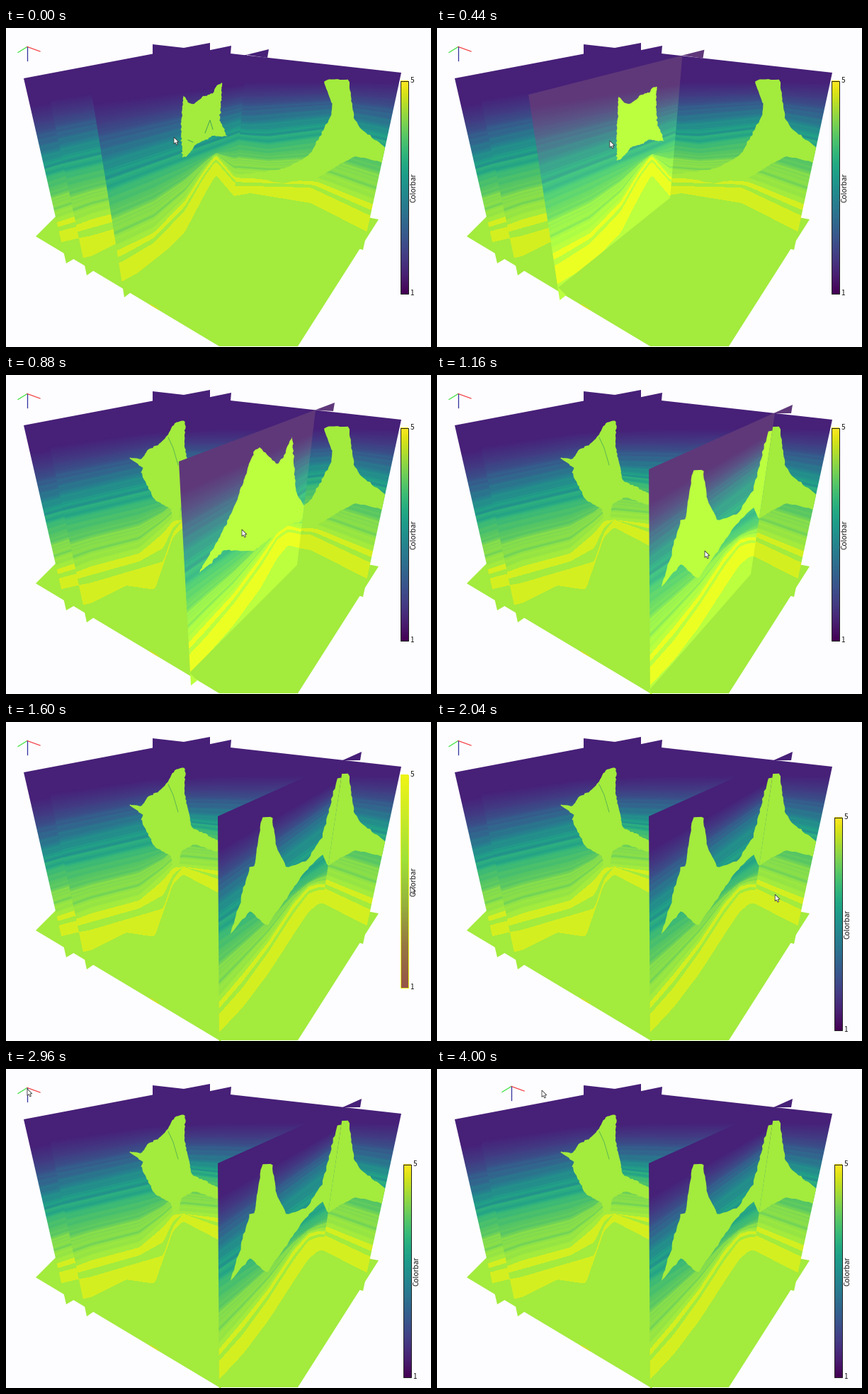
Recreate the animation shown at these times as a matplotlib script. Size 600x450 px, loop 4.04 s.

```python
import numpy as np
import matplotlib.pyplot as plt
from matplotlib.animation import FuncAnimation
from matplotlib.colors import LinearSegmentedColormap, to_rgb
from matplotlib.patches import Polygon, Rectangle
from matplotlib.path import Path

W, H, STEP_MS, FRAMES = 600, 450, 40, 101
LIME, YELLOW = "#a3eb3d", "#d4ef20"
GLOW = np.array([24, 24, 2])
rng = np.random.default_rng(4)

# ---- colour scale of the layers: striped gradient, then two yellow bands ----
ramp = LinearSegmentedColormap.from_list(
    "strata", ["#472078", "#423a83", "#34608d", "#26808e", "#219f88",
               "#33b57c", "#55c565", "#83dc4e", LIME])
grid = np.linspace(0, 1.4, 2801)
noise = np.convolve(rng.normal(size=160), [.25, .5, .25], "same")
ripple = .05 * np.interp(grid, np.linspace(0, 1.05, 160), noise)
ripple *= np.clip((grid - .12) / .3, 0, 1)
LUT = ramp(np.clip(np.where(grid < 1, grid + ripple, 1), 0, 1))[:, :3] * 255
for low, high in ((1.015, 1.06), (1.1, 1.3)):
    LUT[(grid > low) & (grid < high)] = np.array(to_rgb(YELLOW)) * 255
LUT = LUT.astype(int)

LEVELS = [0, .35, .65, 1, 1.1, 1.3, 1.4]
COLS = np.arange(W) + .5
ROWS = (np.arange(H) + .5)[:, None]
KERNEL = np.hanning(11) / np.hanning(11).sum()


def curve(xs, ys):
    line = np.interp(COLS, xs, ys)
    return np.convolve(np.pad(line, 5, "edge"), KERNEL, "valid")


def strata(ys):
    """Layer colours below the given horizon curves."""
    ys = [*ys, ys[-1] + 1]
    depth = np.zeros((H, W))
    for k, rise in enumerate(np.diff(LEVELS)):
        gap = np.maximum(ys[k + 1] - ys[k], .5)
        depth += rise * np.clip((ROWS - ys[k]) / gap, 0, 1)
    return LUT[np.clip(depth * 2000, 0, 2800).astype(int)]


def rough(points, n=160):
    """Even points along an outline, with a slightly ragged edge."""
    p = np.array(points + points[:1], float)
    run = np.r_[0, np.cumsum(np.hypot(*np.diff(p, axis=0).T))]
    at = np.linspace(0, run[-1], n)
    line = np.stack([np.interp(at, run, p[:, i]) for i in (0, 1)], 1)
    return line + rng.normal(0, .5, line.shape)


def blend(keys, s):
    i = min(int(s), len(keys) - 2)
    return keys[i] + (keys[i + 1] - keys[i]) * (s - i)


# ---- moving slice, keyed at four positions ----
# corners: top left, back top, wall foot, front tip
CORNERS = np.array([
    [(121, 92), (371, 30), (322, 238), (167, 380)],
    [(178, 106), (416, 35), (371, 250), (211, 408)],
    [(244, 122), (464, 39), (411, 268), (261, 438)],
    [(299, 133), (502, 42), (443, 281), (301, 463)]], float)
WALL_CUT = np.array([340, 385, 437, 477.])

U = np.array([0, .2, .4, .6, .72, .8, .92, 1])
BASE = np.array([
    [372, 357, 333, 288, 238, 207, 238, 238],
    [415, 376, 340, 292, 235, 208, 235, 238],
    [436, 397, 353, 300, 258, 240, 246, 248],
    [440, 402, 355, 300, 268, 256, 258, 262]], float)
BAND = np.array([26, 28, 30, 30, 26, 19, 20, 20])
SEAM = np.array([20, 22, 17, 16, 11, 10, 9, 7])
# left and right heights of the three upper horizons
UPPER = np.array([
    [(105, 78), (185, 122), (245, 158)],
    [(140, 78), (222, 124), (285, 165)],
    [(165, 80), (245, 124), (310, 175)],
    [(180, 78), (250, 115), (305, 192)]], float)

salt_a = [(249, 182), (247, 140), (250, 95), (258, 106), (264, 108), (279, 96), (292, 92),
          (297, 82), (305, 77), (302, 130), (312, 153), (292, 152), (268, 165), (255, 181)]
salt_b = [(283, 214), (298, 132), (290, 99), (300, 110), (318, 105), (333, 98), (338, 82),
          (347, 80), (340, 140), (351, 163), (376, 188), (376, 204), (343, 189),
          (328, 202), (315, 190), (291, 204)]
salt_c = [(273, 278), (302, 228), (325, 180), (350, 108), (358, 102), (383, 126), (392, 115),
          (404, 86), (409, 165), (422, 186), (418, 206), (395, 213), (350, 248),
          (308, 247), (290, 265)]
salt_d = [(317, 298), (345, 203), (350, 206), (361, 135), (376, 134), (381, 175), (397, 206),
          (425, 195), (447, 160), (467, 80), (490, 73), (462, 205), (454, 203), (447, 186),
          (420, 214), (368, 288), (345, 266)]
SALT = [rough(p) for p in (salt_a, salt_b, salt_c, salt_d)]


def slice_beds(s):
    x0, x1 = blend(CORNERS, s)[0, 0], blend(WALL_CUT, s)
    base = blend(BASE, s)
    xs = x0 + U * (x1 - x0)
    upper = [a + (b - a) * U for a, b in blend(UPPER, s)]
    return [curve(xs, y) for y in (*upper, base - BAND - SEAM, base - BAND, base)]


def slice_outline(s):
    top, back, foot, tip = blend(CORNERS, s)
    cut = blend(WALL_CUT, s)
    return [top, back, back + (-2, 12), (cut, 38 + .118 * (cut - 340)), foot,
            tip - (2, 18), tip + (9, -7), tip]


# ---- fixed planes ----
SIDE = [(25, 71), (207, 36.5), (207, 23), (251, 28), (288, 21), (288, 120), (97, 325), (85, 332)]
SIDE_BEDS = [(110, 98), (180, 162), (225, 200), (288, 262), (300, 280), (315, 297)]
WALL = [(57, 79), (284, 32), (318, 25), (317, 36), (558, 63), (504, 313), (497, 311),
        (430, 400), (300, 400), (124, 342), (114, 349)]
WALL_BEDS = [
    [(57, 100), (200, 80), (300, 75), (560, 75)],
    [(57, 168), (236, 126), (345, 131), (460, 120), (560, 140)],
    [(57, 215), (222, 176), (250, 150), (370, 168), (460, 155), (560, 180)],
    [(57, 292), (120, 266), (188, 248), (236, 203), (300, 208), (440, 215), (560, 262)],
    [(57, 305), (120, 293), (222, 263), (236, 222), (250, 204), (300, 222),
     (430, 225), (515, 265), (560, 280)],
    [(57, 335), (120, 322), (170, 297), (210, 303), (236, 228), (250, 215), (300, 241),
     (345, 233), (430, 247), (515, 290), (560, 310)]]
LEFT_SALT = [
    (175, 117), (191, 119), (200, 106), (214, 99), (228, 85), (234, 73), (241, 66),
    (253, 65), (252, 100), (262, 148), (300, 168), (300, 184), (265, 172), (247, 183),
    (245, 200), (236, 204), (232, 188), (210, 177), (190, 137), (194, 132)]
RIGHT_SALT = [
    (449, 75), (456, 72), (484, 73), (491, 125), (500, 142), (528, 162), (542, 175),
    (540, 192), (495, 181), (475, 190), (440, 212), (390, 219), (330, 207), (395, 198),
    (428, 180), (440, 158), (459, 125), (461, 108), (450, 81)]
FLOOR = [(42, 294), (70, 266), (300, 230), (505, 266), (526, 270), (412, 449), (301, 449)]

# ---- pointer path: ms, x, y ----
MOUSE = np.array([
    (400, 237, 154), (680, 285, 189), (880, 333, 218), (1080, 378, 248),
    (1160, 378, 248), (1440, 571, 230), (1600, 571, 232), (1680, 579, 245),
    (2000, 575, 292), (2200, 86, 48), (2400, 99, 65), (2560, 99, 65), (2880, 30, 28),
    (3000, 30, 28), (3320, 20, 10), (3600, 50, 5), (3840, 105, 26), (4000, 148, 30)], float)


def mouse(t):
    return np.array([np.interp(t, MOUSE[:, 0], MOUSE[:, i]) for i in (1, 2)])


def dragged(t, start, end):
    return mouse(np.clip(t, start, end)) - mouse(start)


# ---- figure ----
fig = plt.figure(figsize=(W / 100, H / 100), dpi=100, facecolor="#fdfdff")
ax = fig.add_axes([0, 0, 1, 1])
ax.axis("off")
PX = .72


def layer(pixels, outline, z):
    im = ax.imshow(pixels.astype(np.uint8), extent=(0, W, H, 0), aspect="auto",
                   interpolation="nearest", zorder=z)
    im.set_clip_path(Path(outline), ax.transData)
    return im


def shape(points, z):
    return ax.add_patch(Polygon(points, fc=LIME, ec="none", zorder=z))


def stroke(points, color, px, z):
    return ax.plot(*zip(*points), color=color, lw=px * PX, zorder=z)[0]


shape(FLOOR, 1)
stroke([(204, 390), (215, 396.5)], "#d4e025", 1.6, 1.1)
layer(strata([curve((25, 100), ys) for ys in SIDE_BEDS]), SIDE, 2)
layer(strata([curve(*zip(*bed)) for bed in WALL_BEDS]), WALL, 3)
shape(rough(LEFT_SALT), 3.1)
stroke([(229, 88), (236, 103), (243, 127)], "#4fae55", .8, 3.2)
shape(rough(RIGHT_SALT), 3.1).set_clip_path(Path(WALL), ax.transData)

sheet = layer(np.zeros((H, W, 3)), slice_outline(0), 4)
salt = shape(SALT[0], 4.1)
cracks = [stroke(p, "#3f9f5a", .9, 4.2) for p in (
    [(281, 148), (288, 130), (292, 143)], [(257, 158), (264, 161)])]

# colour bar
hot = LinearSegmentedColormap.from_list(
    "hot_bar", ["#965548", "#967841", "#96b43c", "#a0e137", "#c8ea28", "#f0f514"])
bar = ax.imshow(np.linspace(1, 0, 256)[:, None], cmap="viridis", aspect="auto",
                extent=(557, 568, 375, 74), zorder=5)
frame = ax.add_patch(Rectangle((557, 74.5), 11, 300.5, fill=False, lw=PX, zorder=5.1))
FONT = dict(family=["Noto Sans CJK JP", "DejaVu Sans"], color="#111111", zorder=5.2)


def label(text, x, y, px=10, **style):
    art = ax.text(x, y, text, size=px * PX, **style, **FONT)
    return art, np.array([x, y])


labels = [label("5", 570.5, 73, va="center_baseline"),
          label("1", 570.5, 373, va="center_baseline"),
          label("Colorbar", 575.5, 225, 10.2, ha="center", va="center", rotation=90)]

# orientation axes
TRIAD = [((-13, 8), "#4be34b"), ((18, 6.5), "#f4484c"), ((0, 19.5), "#3434a0")]
arms = [stroke([(0, 0), end], color, 1.3, 6) for end, color in TRIAD]

ARROW = np.array([(0, 0), (0, 9.5), (2.2, 7.6), (3.8, 11), (5.4, 10.2), (3.9, 7), (6.8, 6.8)])
cursor = ax.add_patch(Polygon(ARROW, fc="white", ec="#333333", lw=.8 * PX, zorder=9))
ax.set(xlim=(0, W), ylim=(H, 0))


def update(i):
    t = i * STEP_MS
    s = np.interp(t, [400, 680, 880, 1080], range(4))
    lit = 200 <= t < 1240 or 2080 <= t < 2480
    glow = GLOW * lit

    outline = Path(slice_outline(s))
    pixels = np.minimum(strata(slice_beds(s)) + glow, 255)
    sheet.set_data(pixels.astype(np.uint8))
    sheet.set_clip_path(outline, ax.transData)
    salt.set_xy(blend(SALT, s))
    salt.set_facecolor(np.minimum(np.array(to_rgb(LIME)) + glow / 255, 1))
    salt.set_clip_path(outline, ax.transData)
    for line in cracks:
        line.set_visible(s == 0)

    dx, dy = dragged(t, 1600, 2000)
    over_bar = 1480 <= t < 2040
    bar.set_extent((557 + dx, 568 + dx, 375 + dy, 74 + dy))
    bar.set_cmap(hot if over_bar else "viridis")
    frame.set_xy((557 + dx, 74.5 + dy))
    frame.set_edgecolor("#e6f01e" if over_bar else "#222222")
    for text, home in labels:
        text.set_position(home + (dx, dy))
    ax.set(xlim=(0, W), ylim=(H, 0))

    ox, oy = np.array([30, 26.5]) + dragged(t, 3000, 3840)
    for line, ((ex, ey), _) in zip(arms, TRIAD):
        line.set_data([ox, ox + ex], [oy, oy + ey])
    cursor.set_xy(ARROW + mouse(t))
    return []


anim = FuncAnimation(fig, update, frames=FRAMES, interval=STEP_MS,
                     repeat=True, repeat_delay=0, blit=False)
plt.show()
```
